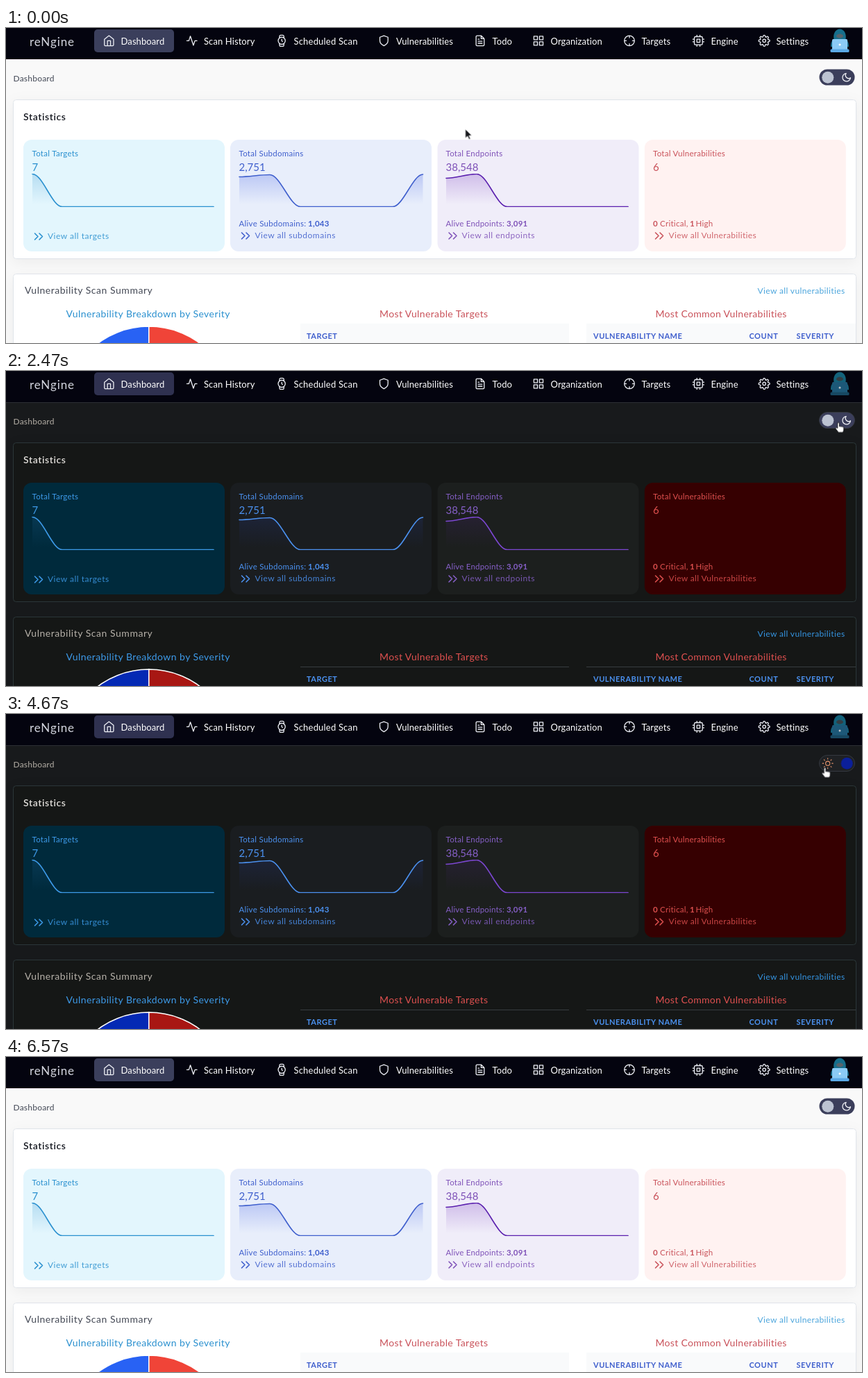
Animation of 1233 by 454 pixels, one loop 7.03 s. Source, as an HTML page:

```html
<!DOCTYPE html>
<html lang="en">
<head>
<meta charset="utf-8">
<title>reNgine dashboard theme switch</title>
<style>
html, body { margin: 0; width: 100%; height: 100%; overflow: hidden; }
svg { display: block; }
#stage { animation: theme 7.03s step-end infinite; font: 400 13px Lato, "Open Sans", sans-serif; }

@keyframes theme {
  0%, 69.27% {
    --page: #f9f9f9; --panel: #fff; --edge: #e0e4ea; --nav-line: #f3e9f1; --active: #3b3f5c;
    --crumb: #515662; --title: #14171f; --summary: #454a56; --link: #4ba5dc;
    --sky: #2a90cf; --blue: #3f5fcd; --violet: #7f52b8; --red: #c9525a; --violet-line: #5a1fae;
    --card1: #e3f6fd; --card2: #e8eefb; --card3: #f0edf9; --card4: #fff2f1;
    --head: #f9fafb; --head-line: #f9fafb; --shade: .24;
    --pie1: #2862f4; --pie2: #f04438;
    --hood: #176f8c; --face: #59636b; --lid: #8bcbf5; --base: #5ba9e6; --dot: #fff; --switch-edge: #0000;
  }
  35.13% {
    --page: #181a1c; --panel: #151716; --edge: #2b3639; --nav-line: #2c2f34; --active: #2f3150;
    --crumb: #a7a29a; --title: #e3e0dc; --summary: #b5b0a8; --link: #3595e2;
    --sky: #3d9ae8; --blue: #4b91ef; --violet: #855fc6; --red: #de504f; --violet-line: #7c47d2;
    --card1: #002a3c; --card2: #1a1d20; --card3: #1c1f1e; --card4: #360001;
    --head: #151716; --head-line: #383d40; --shade: .12;
    --pie1: #0429b4; --pie2: #a81713;
    --hood: #13627b; --face: #343e45; --lid: #1d5878; --base: #174862; --dot: #bcc3c8; --switch-edge: #353941;
  }
}

.line { fill: none; stroke-width: 1.6; stroke-linejoin: round; stroke-linecap: round; }
.chart { clip-path: url(#plot); }
.icon { stroke: #eceef4; stroke-width: 1.8; }
.nav { fill: #fff; letter-spacing: .1px; }
.label { font-size: 11.5px; letter-spacing: .28px; }
.bold { font-weight: 700; }
.num { font-size: 15px; }
.more { font-size: 12px; letter-spacing: .5px; opacity: .87; }
.head { font-size: 14px; letter-spacing: .43px; }
.col { font: 700 11px Lato, "Open Sans", sans-serif; letter-spacing: .5px; fill: var(--blue); }
.panel { fill: var(--panel); stroke: var(--edge); filter: drop-shadow(0 5px 10px #0000000d); }

#track { animation: track 7.03s ease infinite; stroke: var(--switch-edge); }
#knob { animation: knob 7.03s ease infinite; }
@keyframes track {
  0%, 35.13%, 75.39%, 100% { fill: #3b3e5b; }
  41.25%, 69.27% { fill: #1f2124; }
}
@keyframes knob {
  0%, 35.13%, 75.39%, 100% { fill: #bcc3d2; transform: none; }
  41.25%, 69.27% { fill: #0b1f9a; transform: translateX(27.5px); }
}

/* jump-both makes the pointer move at both ends of each leg */
#pointer { animation: move 7.03s step-end infinite; }
#arrow { animation: arrow 7.03s step-end infinite; }
#hand { animation: hand 7.03s step-end infinite; }
@keyframes move {
  0% { transform: translate(661.5px, 145.5px); }
  11.37% { transform: translate(661.5px, 145.5px); animation-timing-function: steps(1, jump-both); }
  13.22% { transform: translate(725.5px, 162px); }
  16.07% { transform: translate(725.5px, 162px); animation-timing-function: steps(7, jump-both); }
  26.03% { transform: translate(1193px, 85px); }
  27.02% { transform: translate(1193px, 85px); animation-timing-function: steps(2, jump-both); }
  28.87% { transform: translate(1199px, 74.5px); }
  40.82% { transform: translate(1204px, 71.5px); }
  43.66% { transform: translate(1204px, 71.5px); animation-timing-function: steps(3, jump-both); }
  46.51% { transform: translate(766px, 176.5px); }
  47.93% { transform: translate(766px, 176.5px); animation-timing-function: steps(1, jump-both); }
  48.79% { transform: translate(759.5px, 173px); }
  50.78% { transform: translate(759.5px, 173px); animation-timing-function: steps(7, jump-both); }
  60.73% { transform: translate(1130.5px, 79.5px); }
  62.16% { transform: translate(1130.5px, 79.5px); animation-timing-function: steps(3, jump-both); }
  65% { transform: translate(1194px, 76.5px); }
  66.42% { transform: translate(1179.5px, 77.5px); }
  76.38% { transform: translate(1179.5px, 77.5px); animation-timing-function: steps(2, jump-both); }
  79.23% { transform: translate(1076px, 93.5px); }
  80.65% { transform: translate(1076px, 93.5px); animation-timing-function: steps(7, jump-both); }
  90.61% { transform: translate(117.5px, 35.5px); }
  91.46% { transform: translate(117.5px, 35.5px); animation-timing-function: steps(3, jump-both); }
  93.45%, 100% { transform: translate(90.5px, 9.5px); }
}
@keyframes arrow {
  0%, 43.66%, 76.38% { opacity: 1; }
  27.02%, 64.05%, 93.45%, 100% { opacity: 0; }
}
@keyframes hand {
  0%, 43.66%, 76.38%, 100% { opacity: 0; }
  27.02%, 64.05% { opacity: 1; }
}
</style>
</head>
<body>
<svg id="stage" width="1233" height="454" viewBox="0 0 1233 454">
  <defs>
    <linearGradient id="fade1" x1="0" y1="211" x2="0" y2="254" gradientUnits="userSpaceOnUse">
      <stop stop-color="var(--sky)" stop-opacity="var(--shade)"/><stop offset="1" stop-color="var(--sky)" stop-opacity="0"/>
    </linearGradient>
    <linearGradient id="fade2" x1="0" y1="211" x2="0" y2="254" gradientUnits="userSpaceOnUse">
      <stop stop-color="#2f4fe0" stop-opacity="var(--shade)"/><stop offset="1" stop-color="#2f4fe0" stop-opacity="0"/>
    </linearGradient>
    <linearGradient id="fade3" x1="0" y1="211" x2="0" y2="254" gradientUnits="userSpaceOnUse">
      <stop stop-color="#6a28b8" stop-opacity="var(--shade)"/><stop offset="1" stop-color="#6a28b8" stop-opacity="0"/>
    </linearGradient>
    <clipPath id="plot"><path d="M0 210H1233V258H0z"/></clipPath>
    <path id="chevrons" class="line" d="M0 0l4.500 4.500-4.500 4.500M6.500 0l4.500 4.500-4.500 4.500"/>
    <path id="tooth" d="M19.4 15a1.65 1.65 0 0 0 .33 1.82l.06.06a2 2 0 0 1-2.83 2.83l-.06-.06a1.65 1.65 0 0 0-1.82-.33 1.65 1.65 0 0 0-1 1.51V21a2 2 0 0 1-4 0v-.09A1.65 1.65 0 0 0 9 19.4"/>
  </defs>

  <rect width="1233" height="454" fill="var(--page)"/>

  <!-- navigation -->
  <rect width="1233" height="45" fill="#04040f"/>
  <path d="M0 45.5H1233" stroke="var(--nav-line)"/>
  <text x="34" y="26" fill="#d3d5de" style="font-size:17px;letter-spacing:.9px">reNgine</text>
  <rect x="127" y="2" width="115" height="33" rx="5" fill="var(--active)"/>
  <g class="line icon">
    <path transform="translate(139.6 9.6) scale(.73)" d="M3 9l9-7 9 7v11a2 2 0 0 1-2 2H5a2 2 0 0 1-2-2zM9 22V12h6v10"/>
    <path transform="translate(259 9.6) scale(.73)" d="M22 12h-4l-3 9L9 3l-3 9H2"/>
    <path transform="translate(388.4 9.6) scale(.73)" d="M5 12a7 7 0 1 0 14 0 7 7 0 1 0-14 0M12 9v3l1.5 1.5M16.5 17.4l-.4 3.8a2 2 0 0 1-2 1.8H9.8a2 2 0 0 1-2-1.8l-.3-3.8M7.5 6.6l.3-3.8A2 2 0 0 1 9.8 1h4.3a2 2 0 0 1 2 1.8l.4 3.8"/>
    <path transform="translate(535.6 9.6) scale(.73)" d="M12 22s8-4 8-10V5l-8-3-8 3v7c0 6 8 10 8 10z"/>
    <path transform="translate(674.2 9.6) scale(.73)" d="M14 2H6a2 2 0 0 0-2 2v16a2 2 0 0 0 2 2h12a2 2 0 0 0 2-2V8zV8h6M16 13H8M16 17H8M10 9H8"/>
    <path transform="translate(758.2 9.6) scale(.73)" d="M3 3h7v7H3zM14 3h7v7h-7zM14 14h7v7h-7zM3 14h7v7H3z"/>
    <path transform="translate(889.2 9.6) scale(.73)" d="M2 12a10 10 0 1 0 20 0 10 10 0 1 0-20 0M22 12h-4M6 12H2M12 6V2M12 22v-4"/>
    <path transform="translate(988.6 9.6) scale(.73)" d="M6 4h12a2 2 0 0 1 2 2v12a2 2 0 0 1-2 2H6a2 2 0 0 1-2-2V6a2 2 0 0 1 2-2zM9 9h6v6H9zM9 1v3M15 1v3M9 20v3M15 20v3M20 9h3M20 14h3M1 9h3M1 14h3"/>
    <g transform="translate(1083.4 9.6) scale(.73)">
      <circle cx="12" cy="12" r="3"/>
      <use href="#tooth"/><use href="#tooth" transform="rotate(90 12 12)"/>
      <use href="#tooth" transform="rotate(180 12 12)"/><use href="#tooth" transform="rotate(270 12 12)"/>
    </g>
  </g>
  <g class="nav">
    <text x="165.5" y="24">Dashboard</text>
    <text x="285" y="24">Scan History</text>
    <text x="414.5" y="24" style="letter-spacing:.2px">Scheduled Scan</text>
    <text x="562" y="24">Vulnerabilities</text>
    <text x="700.5" y="24">Todo</text>
    <text x="784.5" y="24">Organization</text>
    <text x="915.5" y="24">Targets</text>
    <text x="1015.5" y="24">Engine</text>
    <text x="1109.5" y="24">Settings</text>
  </g>

  <!-- avatar -->
  <path d="M1188 27c0-7 2-9 4.500-11-1.500-8 2.500-14.500 8.500-14.500s10 6.500 8.500 14.500c2.500 2 4.500 4 4.500 11z" fill="var(--hood)"/>
  <ellipse cx="1201" cy="11.500" rx="5" ry="3" fill="var(--face)"/>
  <rect x="1190" y="16" width="22" height="16" rx="1.500" fill="var(--lid)"/>
  <rect x="1187.500" y="30.500" width="27" height="4.500" rx="1.500" fill="var(--base)"/>
  <circle cx="1201" cy="24" r="1.500" fill="var(--dot)"/>

  <text x="10.500" y="77" fill="var(--crumb)" style="font-size:12px;font-weight:500;letter-spacing:.2px">Dashboard</text>

  <!-- theme switch -->
  <rect id="track" x="1171.500" y="59.500" width="51" height="23" rx="11.500"/>
  <path class="line" stroke="#e9956c" stroke-width="2.200" transform="translate(1175.500 63) scale(.68)" d="M7.500 12a4.500 4.500 0 1 0 9 0 4.500 4.500 0 1 0-9 0M12 1v2M12 21v2M4.200 4.200l1.400 1.400M18.400 18.400l1.400 1.400M1 12h2M21 12h2M4.200 19.800l1.400-1.400M18.400 5.600l1.400-1.400"/>
  <path class="line" stroke="#f2f3f7" transform="translate(1203 63.500) scale(.64)" style="stroke-width:2px" d="M21 12.800A9 9 0 1 1 11.200 3 7 7 0 0 0 21 12.800z"/>
  <circle id="knob" cx="1183.800" cy="71.200" r="8.500"/>

  <!-- statistics -->
  <rect class="panel" x="10.500" y="103.500" width="1214" height="229" rx="4"/>
  <text x="25" y="133" fill="var(--title)" style="font-size:14px;font-weight:600;letter-spacing:.6px">Statistics</text>

  <rect x="25" y="161" width="290" height="161" rx="12" fill="var(--card1)"/>
  <g fill="var(--sky)">
    <text x="37.500" y="185" class="label">Total Targets</text>
    <text x="37.500" y="206" class="num">7</text>
    <path d="M38 210.500C53 210.500 66 257.500 81 257.500H38z" fill="url(#fade1)"/>
    <path class="line chart" stroke="var(--sky)" d="M38 210.500C53 210.500 66 257.500 81 257.500H299"/>
    <use href="#chevrons" x="41.500" y="296" stroke="var(--sky)"/>
    <text x="60" y="303.500" class="more">View all targets</text>
  </g>

  <rect x="323" y="161" width="290" height="161" rx="12" fill="var(--card2)"/>
  <g fill="var(--blue)">
    <text x="335.500" y="185" class="label">Total Subdomains</text>
    <text x="335.500" y="206" class="num">2,751</text>
    <path d="M336 214.500C351 214.500 365 211.500 380 211.500C395 211.500 409 257.500 424 257.500H557C572 257.500 586 211 600.500 211V257.500H336z" fill="url(#fade2)"/>
    <path class="line chart" stroke="var(--blue)" d="M336 214.500C351 214.500 365 211.500 380 211.500C395 211.500 409 257.500 424 257.500H557C572 257.500 586 211 600.500 211"/>
    <text x="335.500" y="286" class="label">Alive Subdomains: <tspan class="bold" x="435">1,043</tspan></text>
    <use href="#chevrons" x="339.500" y="295" stroke="var(--blue)"/>
    <text x="358.500" y="303" class="more">View all subdomains</text>
  </g>

  <rect x="621.500" y="161" width="290" height="161" rx="12" fill="var(--card3)"/>
  <g fill="var(--violet)">
    <text x="633.500" y="185" class="label">Total Endpoints</text>
    <text x="633.500" y="206" class="num">38,548</text>
    <path d="M634 216.500C649 216.500 663 210.500 678 210.500C693 210.500 707 257.500 722 257.500H634z" fill="url(#fade3)"/>
    <path class="line chart" stroke="var(--violet-line)" d="M634 216.500C649 216.500 663 210.500 678 210.500C693 210.500 707 257.500 722 257.500H896"/>
    <text x="633.500" y="286" class="label" style="letter-spacing:.2px">Alive Endpoints: <tspan class="bold" x="721">3,091</tspan></text>
    <use href="#chevrons" x="638" y="295" stroke="var(--violet)"/>
    <text x="656.500" y="303" class="more">View all endpoints</text>
  </g>

  <rect x="919.800" y="161" width="290" height="161" rx="12" fill="var(--card4)"/>
  <g fill="var(--red)">
    <text x="932" y="185" class="label">Total Vulnerabilities</text>
    <text x="932" y="206" class="num">6</text>
    <text x="932" y="286" class="label"><tspan class="bold">0</tspan><tspan x="942">Critical,</tspan><tspan class="bold" x="985">1</tspan><tspan x="993.500">High</tspan></text>
    <use href="#chevrons" x="935.500" y="295" stroke="var(--red)"/>
    <text x="954.500" y="303" class="more" style="letter-spacing:.35px">View all Vulnerabilities</text>
  </g>

  <!-- scan summary -->
  <rect class="panel" x="10.500" y="354.500" width="1214" height="130" rx="4"/>
  <text x="27" y="383" class="head" fill="var(--summary)" style="letter-spacing:.53px">Vulnerability Scan Summary</text>
  <text x="1082.500" y="383" fill="var(--link)" style="font-size:12px;letter-spacing:.38px">View all vulnerabilities</text>
  <text x="86.500" y="417" class="head" fill="var(--sky)">Vulnerability Breakdown by Severity</text>
  <text x="538" y="417" class="head" fill="var(--red)" style="letter-spacing:.38px">Most Vulnerable Targets</text>
  <text x="935.500" y="417" class="head" fill="var(--red)" style="letter-spacing:.3px">Most Common Vulnerabilities</text>
  <g stroke="#fff" stroke-width="1.600">
    <path d="M205.800 553V430A123 123 0 0 0 205.800 676z" fill="var(--pie1)"/>
    <path d="M205.800 553V430A123 123 0 0 1 205.800 676z" fill="var(--pie2)"/>
  </g>
  <path d="M424 426H811V454H424zM836 426H1224V454H836z" fill="var(--head)"/>
  <path d="M424 426.500H811M836 426.500H1224" stroke="var(--head-line)"/>
  <g class="col">
    <text x="433" y="448">TARGET</text>
    <text x="846" y="448">VULNERABILITY NAME</text>
    <text x="1070.500" y="448">COUNT</text>
    <text x="1138.500" y="448">SEVERITY</text>
  </g>

  <g id="pointer">
    <path id="arrow" d="M0 0V13.500L3.300 10.600 5.500 15.200 7.700 14.200 5.600 9.800H10z" fill="#15161a" stroke="#fff"/>
    <path id="hand" d="M-1.200 8V1a1.300 1.300 0 0 1 2.600 0V5.500a1.200 1.200 0 0 1 2.200.4 1.200 1.200 0 0 1 2.200.4 1.100 1.100 0 0 1 2 .6V10c0 2-1 2.400-1.200 4H-.2C-.6 12.300-3 10.500-4 8.500c-.5-1.300 1-2 2-1z" fill="#fff" stroke="#15161a" stroke-width=".9"/>
  </g>
</svg>
</body>
</html>
```
